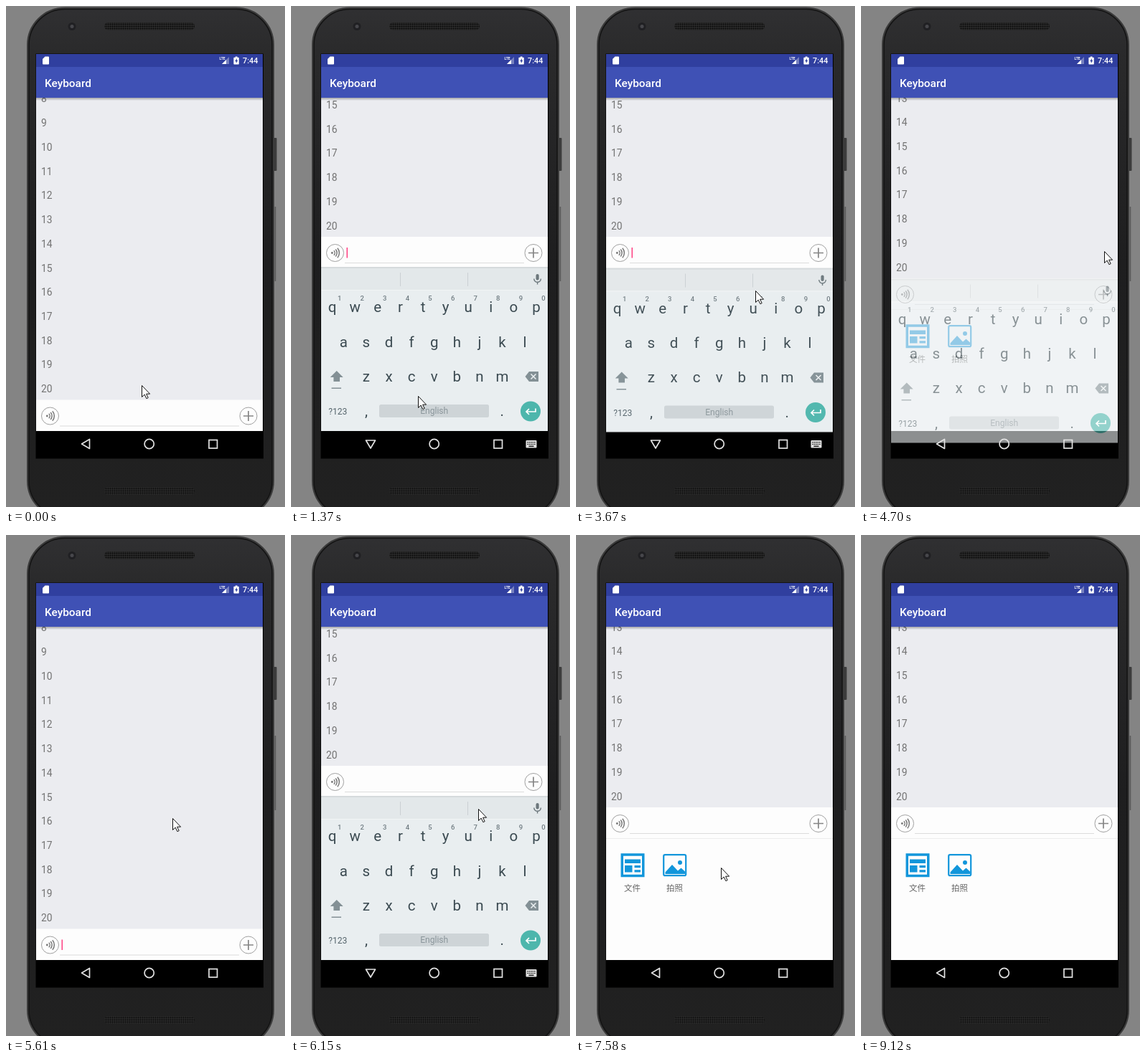
Animation of 389x699 px, one loop 9.4 s. Source, as an HTML page:

```html
<!DOCTYPE html>
<html lang="zh-CN">
<head>
<meta charset="utf-8">
<title>Keyboard</title>
<style>
  html, body { margin: 0; width: 100%; height: 100%; overflow: hidden; background: #848484; }
  svg { display: block; width: 389px; height: 699px; }
  text { font-family: Roboto, sans-serif; }
  .mid { text-anchor: middle; }
  .row { font-size: 13.84px; fill: #727272; }
  .cjk { font: 11.5px "Noto Sans CJK SC", "Noto Sans CJK", sans-serif; fill: #666; }
  .key { font-size: 20.5px; fill: #3b4a51; }
  .hint { font-size: 9.5px; font-weight: 500; fill: #707c82; }
  .small { font-size: 12.1px; }
  .line { fill: none; stroke: #e2e2e2; stroke-width: 1.7; }
</style>
</head>
<body>
<svg viewBox="0 0 389 699">
  <defs>
    <linearGradient id="shell" x1="0" y1="0" x2="0" y2="1">
      <stop offset="0" stop-color="#303032"/>
      <stop offset=".09" stop-color="#2a2a2b"/>
      <stop offset=".5" stop-color="#1e1e1f"/>
      <stop offset="1" stop-color="#212121"/>
    </linearGradient>
    <linearGradient id="shade" x1="0" y1="0" x2="0" y2="1">
      <stop offset="0" stop-opacity=".3"/>
      <stop offset="1" stop-opacity="0"/>
    </linearGradient>
    <pattern id="mesh" width="3" height="3" patternUnits="userSpaceOnUse">
      <rect width="3" height="3" fill="#2a2a2a"/>
      <circle cx="1.5" cy="1.5" r="1.1" fill="#0b0b0b"/>
    </pattern>
    <clipPath id="view"><rect x="42" y="128" width="316" height="465"/></clipPath>
  </defs>

  <!-- phone -->
  <rect width="389" height="699" fill="#848484"/>
  <rect x="373" y="184" width="4.5" height="46" rx="1" fill="#3c3c3c"/>
  <path d="M375.5 280V384" stroke="#555" stroke-width="1.5"/>
  <rect x="30" y="2.5" width="343" height="712" rx="52" fill="url(#shell)" stroke="#3b3b3b" stroke-width="2"/>
  <rect x="32" y="4.5" width="339" height="708" rx="50" fill="none" stroke="#141414" stroke-width="1.5"/>
  <circle cx="92" cy="28.5" r="5.5" fill="#202023"/>
  <circle cx="92" cy="28.5" r="2.5" fill="#47474c"/>
  <rect x="137" y="23" width="126" height="10.5" rx="5" fill="url(#mesh)"/>
  <rect x="137" y="671.5" width="126" height="10.5" rx="5" fill="url(#mesh)"/>

  <!-- screen -->
  <rect x="41.5" y="66.5" width="317.5" height="565" fill="#000"/>
  <rect x="42" y="128" width="316" height="465" fill="#ebecf0"/>
  <g clip-path="url(#view)">
    <g id="content">
      <g id="rows"></g>
      <rect x="42" width="316" height="470" fill="#fdfdfd"/>
      <path d="M75 36.5H325" stroke="#dcdcdc"/>
      <g fill="none" stroke="#a0a0a0">
        <circle cx="61.5" cy="22.5" r="12"/>
        <circle cx="338" cy="22.5" r="12"/>
        <path d="M331 22.5h14M338 15.5v14" stroke="#858585" stroke-width="1.7"/>
        <path d="M59.8 19.3a4.6 4.6 0 0 1 0 6.4M62.2 17.6a7.4 7.4 0 0 1 0 9.8M64.8 15.7a10.4 10.4 0 0 1 0 13.6" stroke="#777" stroke-width="1.5"/>
      </g>
      <circle cx="57.3" cy="22.5" r="1.4" fill="#777"/>
      <rect id="caret" x="77.5" y="15" width="1.5" height="14.5" fill="#ff4081"/>
      <g id="panel">
        <path d="M42 43.5H358" stroke="#ececec"/>
        <g fill="#1296db">
          <path fill-rule="evenodd" d="M62.5 64.3h33v33h-33zM66 67.8v26h26v-26z"/>
          <path d="M68 72.5h22v5.5H68zM68 81h10.5v9.5H68zM81.5 81H90v3.2h-8.500zM81.500 87.300H90v3.200h-8.500z"/>
          <rect x="122.200" y="66.200" width="31" height="29" rx="2" fill="none" stroke="#1296db" stroke-width="2.200"/>
          <path d="M124.500 90.500l9.500-10.500 8 8.500 4.500-4 5.500 5v3.500h-27.500z"/>
          <circle cx="145" cy="77" r="3"/>
        </g>
        <text class="cjk mid" x="78.500" y="117">文件</text>
        <text class="cjk mid" x="137.500" y="117">拍照</text>
      </g>
    </g>
    <rect x="42" y="128" width="316" height="4" fill="url(#shade)"/>
  </g>

  <!-- status and title -->
  <rect x="42" y="67" width="316" height="18" fill="#303f9f"/>
  <rect x="42" y="85" width="316" height="43" fill="#3f51b5"/>
  <g fill="#fff">
    <path d="M54.500 70.500h4.500q1 0 1 1v9q0 1-1 1h-7q-1 0-1-1v-6.500z"/>
    <text x="297.500" y="74.500" font-size="5" font-weight="700">LTE</text>
    <path d="M311 71v10h-10z" opacity=".35"/>
    <path d="M307 75v6h-6z"/>
    <path d="M319.800 70.500h2.700v1.200h1.600q.7 0 .7.700v8.400q0 .7-.7.700h-6q-.7 0-.7-.7v-8.400q0-.7.7-.7h1.700z"/>
    <path d="M321.800 73l-2.600 4.200h1.600v2.800l2.500-4.200h-1.500z" fill="#303f9f"/>
    <text x="330" y="80.300" font-size="10.800" font-weight="500">7:44</text>
    <text x="54" y="113" font-size="15.400" font-weight="500">Keyboard</text>
  </g>

  <!-- soft keyboard -->
  <g id="board">
    <rect x="42" y="364" width="316" height="2.500" fill="#d5dadc"/>
    <rect x="42" y="366" width="316" height="30" fill="#e3e8ea"/>
    <rect x="42" y="396" width="316" height="197" fill="#e9eef0"/>
    <path d="M42 396.500H358" stroke="#f1f4f5"/>
    <path d="M152.500 372V391M246.500 372V391" stroke="#cad0d3"/>
    <g id="keys"></g>
    <g fill="#6c777c">
      <rect x="341.500" y="374" width="4.200" height="8.500" rx="2.100"/>
      <path d="M338.800 380.500a4.800 4.800 0 0 0 9.600 0M343.600 385.300v3.200" fill="none" stroke="#6c777c" stroke-width="1.400"/>
    </g>
    <g fill="#839095">
      <path d="M63.700 509l9 9h-4.700v6h-8.600v-6h-4.700z"/>
      <rect x="56.500" y="532.500" width="13.500" height="1.500"/>
      <path d="M332 510h13v14h-13l-5.500-7z"/>
      <path d="M334.500 513.500l7 7m0-7l-7 7" stroke="#e9eef0" stroke-width="1.600"/>
    </g>
    <rect x="123" y="556" width="153" height="18" rx="2.500" fill="#ced4d7"/>
    <text class="small mid" x="199.700" y="569" fill="#8b969b">English</text>
    <text class="small mid" x="65.300" y="570" fill="#55646b">?123</text>
    <circle cx="334" cy="565.500" r="14" fill="#4db6ac"/>
    <path d="M341 561.500v4.500h-13m4-4l-4 4 4 4" fill="none" stroke="#fff" stroke-width="1.700"/>
  </g>

  <!-- navigation -->
  <g class="line">
    <path id="back" stroke-linejoin="round"/>
    <circle cx="199.700" cy="611" r="6.600"/>
    <rect x="283" y="605.500" width="11.500" height="11.500"/>
  </g>
  <g id="switcher">
    <rect x="327.500" y="606" width="15" height="10.500" rx="1" fill="#e2e2e2"/>
    <path d="M329.500 608.700h11.500M329.500 611.300h11.500" stroke="#000" stroke-width="1.300" stroke-dasharray="1.400 1"/>
    <path d="M331.500 614.200h7" stroke="#000" stroke-width="1.300"/>
  </g>

  <path id="pointer" d="M.5.5v16l3.700-3.400 2.700 5.600 2.300-1.100-2.600-5.400h5z" fill="#fff" stroke="#111"/>
</svg>
<script>
const LOOP = 9400, PITCH = 33.74, KEY = 31.6;
const $ = id => document.getElementById(id);
const text = (cls, x, y, s) => `<text class="${cls}" x="${x}" y="${y}">${s}</text>`;

for (let n = 7; n <= 20; n++)
  $('rows').innerHTML += text('row', 49, -10.3 - (20 - n) * PITCH, n);

const keyRow = (chars, x, y, cls = 'key mid') =>
  [...chars].map((c, i) => text(cls, x + i * KEY, y, c)).join('');
$('keys').innerHTML =
  keyRow('qwertyuiop', 57.6, 427) +
  keyRow('1234567890', 67.6, 410.5, 'hint mid') +
  keyRow('asdfghjkl', 73.3, 475.5) +
  keyRow('zxcvbnm', 104.9, 523.8) +
  text('key mid', 105, 572, ',') + text('key mid', 294.3, 572, '.');

const TICKS = [0, 280, 400, 550, 950, 1070, 1190, 1320, 1470, 1620, 1760, 1910, 2030,
  2300, 2420, 2540, 2820, 2970, 3120, 3270, 3410, 3550, 3670, 3790, 3910, 4060,
  4460, 4580, 4700, 4820, 4940, 5060, 5210, 5360, 5610, 5730, 5850, 5970, 6090, 6240, 6390, 6540,
  6820, 6970, 7090, 7210, 7370, 7530, 7690, 7850, 8000, 8120, 8270, 8420, 8600, 8780, 8970, 9120];

// bar: top of the input bar; alpha and drop: keyboard fade and slide
const STATES = {
  idle:   { bar: 549.5, alpha: 0, drop: 0 },
  focus:  { bar: 549.5, alpha: 0, drop: 0, caret: true },
  rise:   { bar: 322, alpha: .6, drop: 10, caret: true, ime: true },
  settle: { bar: 322, alpha: .96, drop: 1.5, caret: true, ime: true },
  typing: { bar: 322, alpha: 1, drop: 0, caret: true, ime: true },
  both:   { bar: 153, alpha: 1, drop: 0, panel: true, ime: true },
  fall:   { bar: 380, alpha: .6, drop: 16.5, panel: true },
  tools:  { bar: 380, alpha: 0, drop: 0, panel: true }
};
const SCRIPT = [
  [0, 'idle'], [950, 'focus'], [1070, 'rise'], [1190, 'settle'], [1320, 'typing'],
  [2300, 'both'], [2420, 'fall'], [2540, 'tools'],
  [3410, 'focus'], [3550, 'rise'], [3670, 'settle'], [3790, 'typing'],
  [4460, 'both'], [4700, 'fall'], [4820, 'tools'],
  [5610, 'focus'], [5730, 'rise'], [5850, 'settle'], [5970, 'typing'],
  [6820, 'both'], [6970, 'fall'], [7090, 'tools']
];
const PATH = [
  [0, 189, 529], [160, 189, 529], [550, 151, 573], [1190, 151, 573], [1760, 350, 352],
  [1910, 346, 346], [2030, 345, 345], [2700, 345, 345], [3270, 250, 397], [3790, 250, 397],
  [4060, 339, 342], [4820, 339, 342], [5360, 232, 395], [5850, 232, 395], [6540, 336, 347],
  [7090, 336, 347], [7850, 119, 536], [8970, 368, 696], [LOOP, 368, 696]
];

const lastBefore = (list, t) => list.filter(e => e[0] <= t).pop();
const ease = p => p * p * (3 - 2 * p);

function pointerAt(t) {
  const i = PATH.findIndex(p => p[0] > t);
  const [t0, x0, y0] = PATH[i - 1], [t1, x1, y1] = PATH[i];
  const p = ease((t - t0) / (t1 - t0));
  return [Math.round(x0 + (x1 - x0) * p), Math.round(y0 + (y1 - y0) * p)];
}

const show = (id, on) => $(id).setAttribute('visibility', on ? 'visible' : 'hidden');
const move = (id, x, y) => $(id).setAttribute('transform', `translate(${x} ${y})`);

function draw(time) {
  const t = TICKS.filter(k => k <= time).pop();
  const s = STATES[lastBefore(SCRIPT, t)[1]];
  const focused = lastBefore(SCRIPT.filter(e => e[1] === 'focus'), t);
  const lit = focused && Math.floor((t - focused[0]) / 480) % 2 === 0;
  move('content', 0, s.bar);
  show('caret', s.caret && lit);
  show('panel', s.panel);
  move('board', 0, s.drop);
  $('board').setAttribute('opacity', s.alpha);
  show('switcher', s.ime);
  $('back').setAttribute('d', s.ime ? 'M104.500 606h13l-6.500 11z' : 'M105.500 611l11-6.500v13z');
  move('pointer', ...pointerAt(t));
  show('pointer', t < 9120);
}

const start = performance.now();
function frame() {
  draw((performance.now() - start) % LOOP);
  requestAnimationFrame(frame);
}
frame();
</script>
</body>
</html>
```
